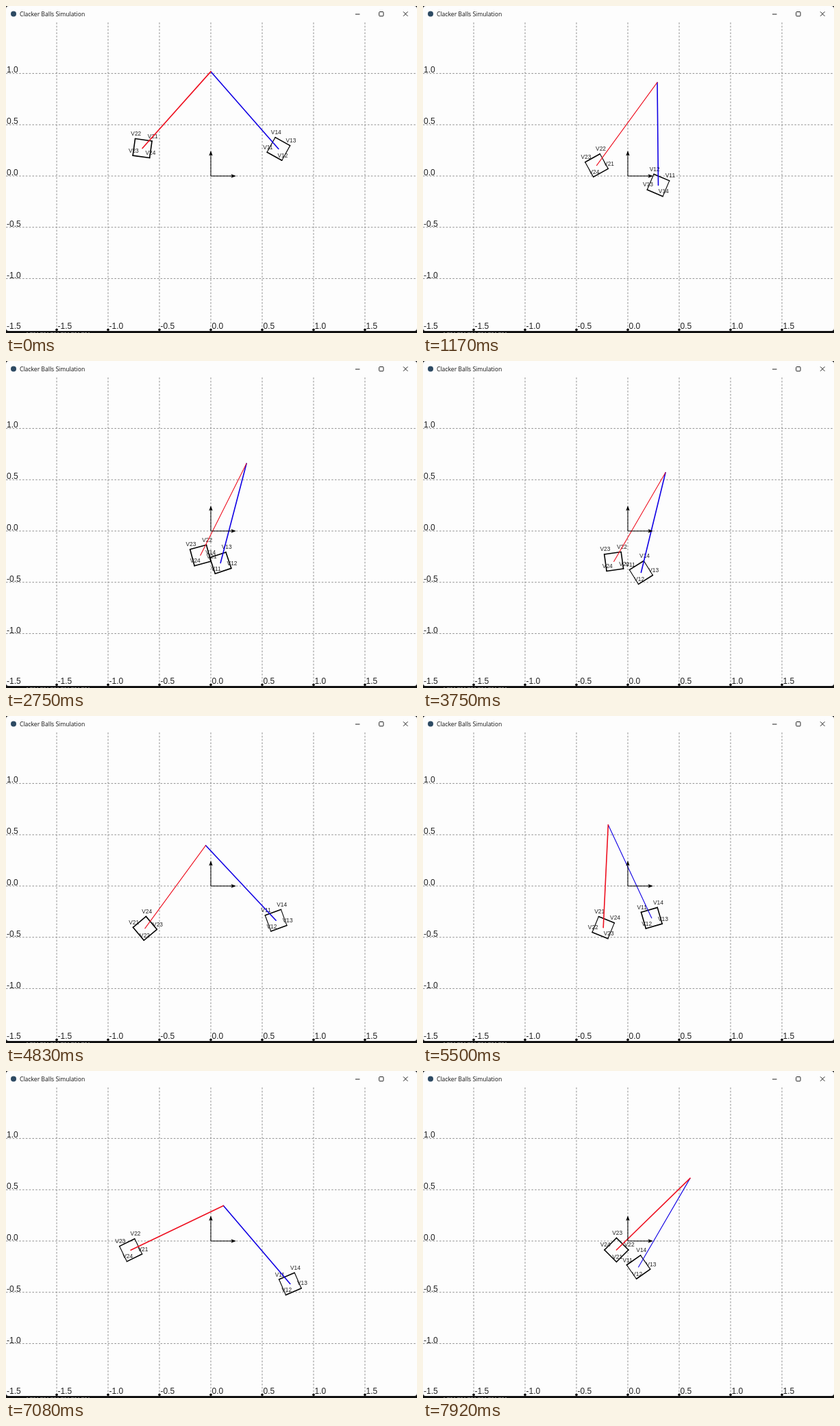
These frames come from a looping animation (600 by 477 pixels, 8000 ms). An HTML page with a canvas:

```html
<!DOCTYPE html>
<html lang="en">
<head>
<meta charset="utf-8">
<title>Clacker Balls Simulation</title>
<style>
  html, body { margin: 0; width: 100%; height: 100%; overflow: hidden; background: #fdfdfd; }
  canvas { display: block; }
</style>
</head>
<body>
<canvas id="stage" width="600" height="477"></canvas>
<script>
const ctx = document.getElementById('stage').getContext('2d');
const LOOP = 8000, STEPS = 96, RAD = Math.PI / 180;
const ROD = 150, HALF_DIAG = 17.5, REST = 12;
const X0 = 299, Y0 = 248, UNIT_X = 75, UNIT_Y = 74.8;
const SANS = '"Liberation Sans", Arial, sans-serif';

// step, pivot x, height of the balls' midpoint, rotation of each block
const POSES = [
  [0, 299, 208, 196, 37], [14, 342, 247, 22, -16], [25, 265, 279, -65, -25],
  [35, 367, 291, -129, -31], [45, 354, 300.5, -193, -37], [58, 291.5, 304, -205, -185],
  [76, 269.5, 295.5, -209, -315], [95, 390, 273.5, -190, -450]
];
// step of each clack and how far the rods open after it
const CLACKS = [[-10.8, 71], [10.8, 56.5], [33, 16], [44.72, 91], [62.8, 16], [70, 97], [95.3, 0]];

// Cubic curve through one column of the poses
function curve(n, col) {
  const last = POSES.length - 1;
  const i = Math.min(POSES.findLastIndex(p => p[0] <= n), last - 1);
  const a = POSES[i], b = POSES[i + 1];
  const slope = j => {
    const p = POSES[Math.max(j - 1, 0)], q = POSES[Math.min(j + 1, last)];
    return (q[col] - p[col]) / (q[0] - p[0]);
  };
  const h = b[0] - a[0], u = (n - a[0]) / h, v = 1 - u;
  return v * v * (1 + 2 * u) * a[col] + u * u * (3 - 2 * u) * b[col]
    + h * u * v * (v * slope(i) - u * slope(i + 1));
}

function spread(n) {
  const i = CLACKS.findLastIndex(c => c[0] <= n);
  const [start, height] = CLACKS[i], end = CLACKS[i + 1][0];
  return REST + height * Math.sin(Math.PI * (n - start) / (end - start));
}

function line(x1, y1, x2, y2, color = '#000', width = 1) {
  ctx.strokeStyle = color;
  ctx.lineWidth = width;
  ctx.beginPath();
  ctx.moveTo(x1, y1);
  ctx.lineTo(x2, y2);
  ctx.stroke();
}

// Unsmoothed lines look thinner at moderately steep angles
function bar(x1, y1, x2, y2, color) {
  const tilt = Math.atan2(Math.abs(x2 - x1), Math.abs(y2 - y1)) / RAD;
  line(x1, y1, x2, y2, color, tilt > 20 && tilt < 39 ? 1.1 : 1.6);
}

function text(str, x, y, font, color = '#222', align = 'left') {
  ctx.font = font;
  ctx.fillStyle = color;
  ctx.textAlign = align;
  ctx.fillText(str, x, y);
}

function dot(x, y, r, color) {
  ctx.fillStyle = color;
  ctx.beginPath();
  ctx.arc(x, y, r, 0, 7);
  ctx.fill();
}

function arrow(dx, dy) {
  const x = X0 + 37 * dx, y = Y0 + 37 * dy;
  line(X0, Y0, x - 5 * dx, y - 5 * dy);
  ctx.fillStyle = '#000';
  ctx.beginPath();
  ctx.moveTo(x, y);
  ctx.lineTo(x - 7.5 * dx + 2.7 * dy, y - 7.5 * dy + 2.7 * dx);
  ctx.lineTo(x - 6 * dx, y - 6 * dy);
  ctx.lineTo(x - 7.5 * dx - 2.7 * dy, y - 7.5 * dy - 2.7 * dx);
  ctx.fill();
}

function drawGrid() {
  for (let k = -3; k <= 3; k++) {
    const x = X0 + UNIT_X * k, y = Y0 - UNIT_Y * k, label = (k / 2).toFixed(1);
    ctx.setLineDash([2.6, 2.2]);
    line(x, 24, x, 473, '#909090');
    if (Math.abs(k) < 3) line(0, y, 600, y, '#909090');
    ctx.setLineDash([]);
    if (k < 3) text(label, 1, y - 1, '12px ' + SANS);
    text(label, x + 1.5, 470.8, '12px ' + SANS);
    dot(x, 472.3, 1.8, '#000');
  }
}

function drawWindow() {
  ctx.fillStyle = '#111';
  ctx.fillRect(0, 0, 600, 477);
  ctx.fillStyle = '#fdfdfd';
  ctx.beginPath();
  ctx.roundRect(0, 0, 600, 474, 4);
  ctx.fill();
  ctx.fillStyle = '#777';
  for (let x = 30; x < 124; x += 5) ctx.fillRect(x, 476, 2 + x % 3, 1);

  dot(11, 11.5, 4, '#2d4a63');
  text('Clacker Balls Simulation', 20, 14.5, '8.6px "Open Sans", "Noto Sans", sans-serif', '#111');
  line(510, 12, 516.5, 12, '#222');
  ctx.beginPath();
  ctx.roundRect(544.7, 8.5, 6.3, 6.3, 1);
  ctx.stroke();
  line(580, 8.3, 586.5, 14.8, '#222');
  line(586.5, 8.3, 580, 14.8, '#222');
}

function drawBall(px, py, swing, spin, id, color) {
  const cx = px + ROD * Math.sin(swing), cy = py + ROD * Math.cos(swing);
  const corners = [0, 1, 2, 3].map(k => {
    const a = (spin + 90 * k) * RAD;
    return [cx + HALF_DIAG * Math.cos(a), cy - HALF_DIAG * Math.sin(a)];
  });
  corners.forEach(([x, y], k) => {
    bar(x, y, ...corners[(k + 1) % 4], '#000');
    text('V' + id + (k + 1), x + 1.2, y - 4.5, '8.4px ' + SANS, '#222', 'center');
  });
  bar(px, py, cx, cy, color);
}

function render(ms) {
  const n = Math.floor((ms % LOOP) / LOOP * STEPS + 0.05) % STEPS;
  const half = spread(n) / 2 * RAD, reach = ROD * Math.cos(half);
  // The balls' midpoint never leaves the vertical axis
  const px = curve(n, 1), tilt = Math.asin((X0 - 0.5 - px) / reach);
  const py = curve(n, 2) - reach * Math.cos(tilt);
  drawWindow();
  drawGrid();
  ctx.lineCap = 'round';
  drawBall(px, py, tilt + half, curve(n, 3), 1, '#1000e4');
  drawBall(px, py, tilt - half, curve(n, 4), 2, '#ee1020');
  ctx.lineCap = 'butt';
  arrow(1, 0);
  arrow(0, -1);
}

const begin = performance.now();
function tick() {
  render(performance.now() - begin);
  requestAnimationFrame(tick);
}
tick();
</script>
</body>
</html>
```
